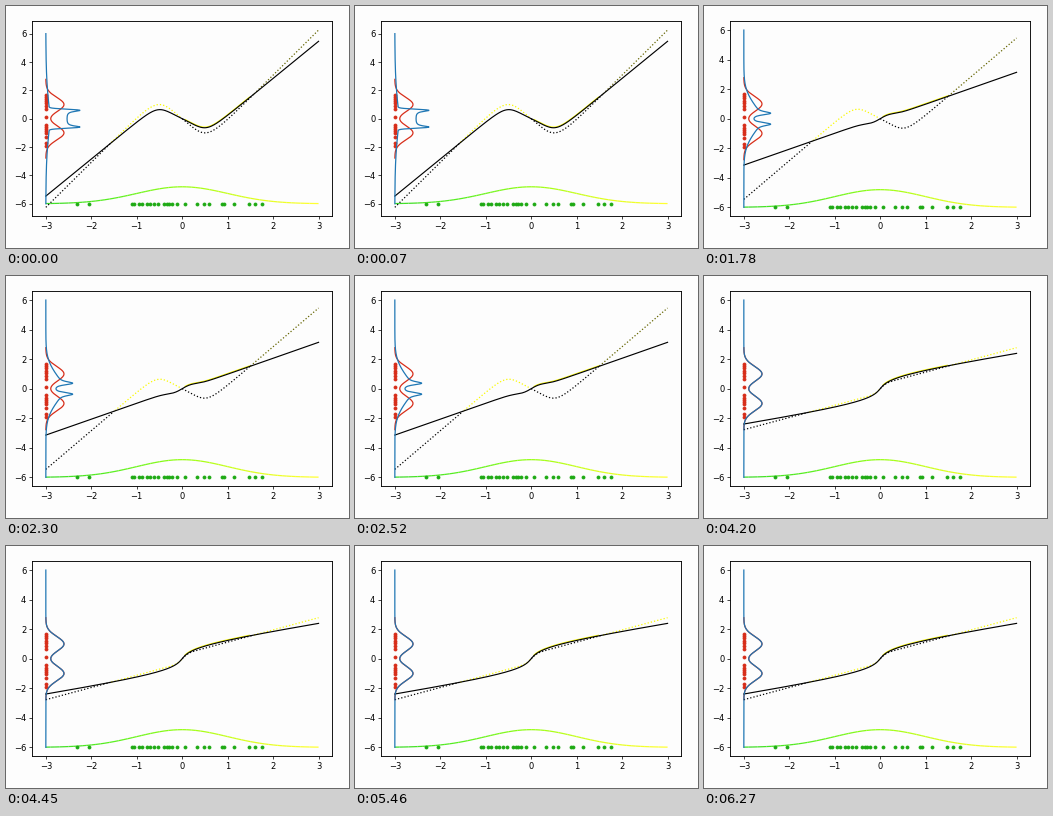
These frames come from a looping animation (343x242 px, 7080 ms). A matplotlib script:

```python
import math

import numpy as np
import matplotlib.pyplot as plt
from matplotlib.animation import FuncAnimation
from matplotlib.collections import LineCollection
from matplotlib.colors import LinearSegmentedColormap

W, H, DPI = 343, 242, 64
STEP, FRAMES = 30, 236
STARTS = [0, 1780, 2980, 4200]
PAPER = "#fdfdfd"
YELLOW, OLIVE = "#fafa00", "#646400"

plt.rcParams.update({
    "font.family": "DejaVu Sans", "font.size": 9.4,
    "axes.linewidth": 1.0,
    "xtick.major.size": 3.3, "ytick.major.size": 3.3,
    "xtick.major.pad": 3.3, "ytick.major.pad": 3.3,
    "lines.linewidth": 1.4,
})


def normal(x, mean=0.0, std=1.0):
    return np.exp(-((x - mean) / std) ** 2 / 2) / (std * math.sqrt(2 * math.pi))


def mixture(y):
    return (normal(y, -1, 0.5) + normal(y, 1, 0.5)) / 2


def cdf(x):
    return np.array([0.5 * (1 + math.erf(v / math.sqrt(2))) for v in x])


def soft_clip(u, p):
    return u / (1 + np.abs(u) ** p) ** (1 / p)


# Monotone map carrying the normal law onto the mixture
grid = np.linspace(-5, 5, 2001)
mix_cdf = (cdf((grid + 1) / 0.5) + cdf((grid - 1) / 0.5)) / 2
transport = np.interp(cdf(grid), mix_cdf, grid)

MAPS = [
    lambda x: 3.184 * x - 3.3 * soft_clip(1.77 * x, 4),
    lambda x: 2.62 * x - 2.4 * soft_clip(1.773 * x, 5),
    lambda x: (1.08 * x - 0.1 * np.tanh(2 * x)
               + 0.95 * x * np.exp(-(x / 0.27) ** 2)),
    lambda x: 0.825 * x + 0.3 * np.tanh(8 * x),
    lambda x: np.interp(x, grid, transport),
]

xs = np.linspace(-3, 3, 301)
ys = np.linspace(-6, 6, 481)


def pushed_density(f, width=0.06):
    """Smoothed density of f(X) for a standard normal X, sampled on ys."""
    x = np.linspace(-4.5, 4.5, 60001)
    gap = ys[1] - ys[0]
    edges = np.append(ys - gap / 2, ys[-1] + gap / 2)
    hist, _ = np.histogram(f(x), edges, weights=normal(x))
    hist = hist * (x[1] - x[0]) / gap
    kernel = normal(np.arange(-20, 21) * gap, 0, width)
    return np.convolve(hist, kernel / kernel.sum(), mode="same")


densities = [pushed_density(f) for f in MAPS[1:4]] + [mixture(ys)]

x_samples = [-2.31, -2.06, -1.10, -1.07, -0.94, -0.89, -0.77, -0.70, -0.63,
             -0.54, -0.41, -0.33, -0.29, -0.235, -0.125, 0.06, 0.33, 0.49,
             0.59, 0.865, 0.91, 1.14, 1.46, 1.61, 1.745]
y_samples = [1.69, 1.55, 1.42, 1.22, 1.08, 0.88, 0.68, 0.14, -0.44, -0.61,
             -0.74, -0.88, -1.02, -1.29, -1.73, -1.93]

fig = plt.figure(figsize=(W / DPI, H / DPI), dpi=DPI, facecolor=PAPER)
ax = fig.add_axes([26.2 / W, 1 - 210.2 / H, 300 / W, 195 / H], facecolor=PAPER)
ax.set_xlim(-3.3, 3.3)
ax.set_xticks(range(-3, 4))
ax.set_yticks(range(-6, 7, 2))

# Bell curve of the input law, shaded from green to yellow
bell = np.column_stack([xs, -6 + 3 * normal(xs)])[::5]
shade = LinearSegmentedColormap.from_list(
    "shade", ["#3cdc28", "#5af01e", "#96ff14", "#dcff1e", "#ffff32"])
ax.add_collection(LineCollection(
    np.stack([bell[:-1], bell[1:]], axis=1),
    colors=shade(np.linspace(0, 1, len(bell) - 1)),
    linewidths=1.4, capstyle="butt", zorder=2))

dots = dict(marker="o", ls="none", ms=3.4, mew=0.9)
ax.plot(x_samples, np.full(len(x_samples), -6.0), color="#1eaa14", **dots)
ax.plot(np.full(len(y_samples), -3.0), y_samples, color="#d72d19", **dots)

body = ys[np.abs(ys) < 2.8]
ax.plot(-3 + mixture(body), body, color="#d72d19")
blue, = ax.plot([], [], color="#1f77b4", zorder=2.5)
glow, = ax.plot([], [], color=YELLOW, lw=1.1)
dotted = [ax.plot([], [], ls=":", color=c)[0] for c in ("black", YELLOW, OLIVE)]
solid, = ax.plot([], [], color="black", lw=1.3)


def stage_at(ms):
    # Nearest frame to each change
    return sum(ms + STEP / 2 >= start for start in STARTS) - 1


def draw(frame):
    stage = stage_at(frame * STEP)
    old, new = MAPS[stage](xs), MAPS[stage + 1](xs)
    reach = max(6, abs(old).max()) * 1.1
    ax.set_ylim(-reach, reach)

    above = old > new
    dim = above & (xs > 0) & (stage < 2)
    for line, mask in zip(dotted, (~above, above & ~dim, dim)):
        line.set_data(xs, np.where(mask, old, np.nan))

    solid.set_data(xs, new)
    glow.set_data(xs, np.where((xs > 0.05) & (xs < 1.5), new + 0.05, np.nan))
    blue.set_data(-3 + densities[stage], ys)
    return [blue, glow, solid, *dotted]


anim = FuncAnimation(fig, draw, frames=FRAMES, init_func=lambda: draw(0),
                     interval=STEP, repeat=True, repeat_delay=0, blit=False)
plt.show()
```
